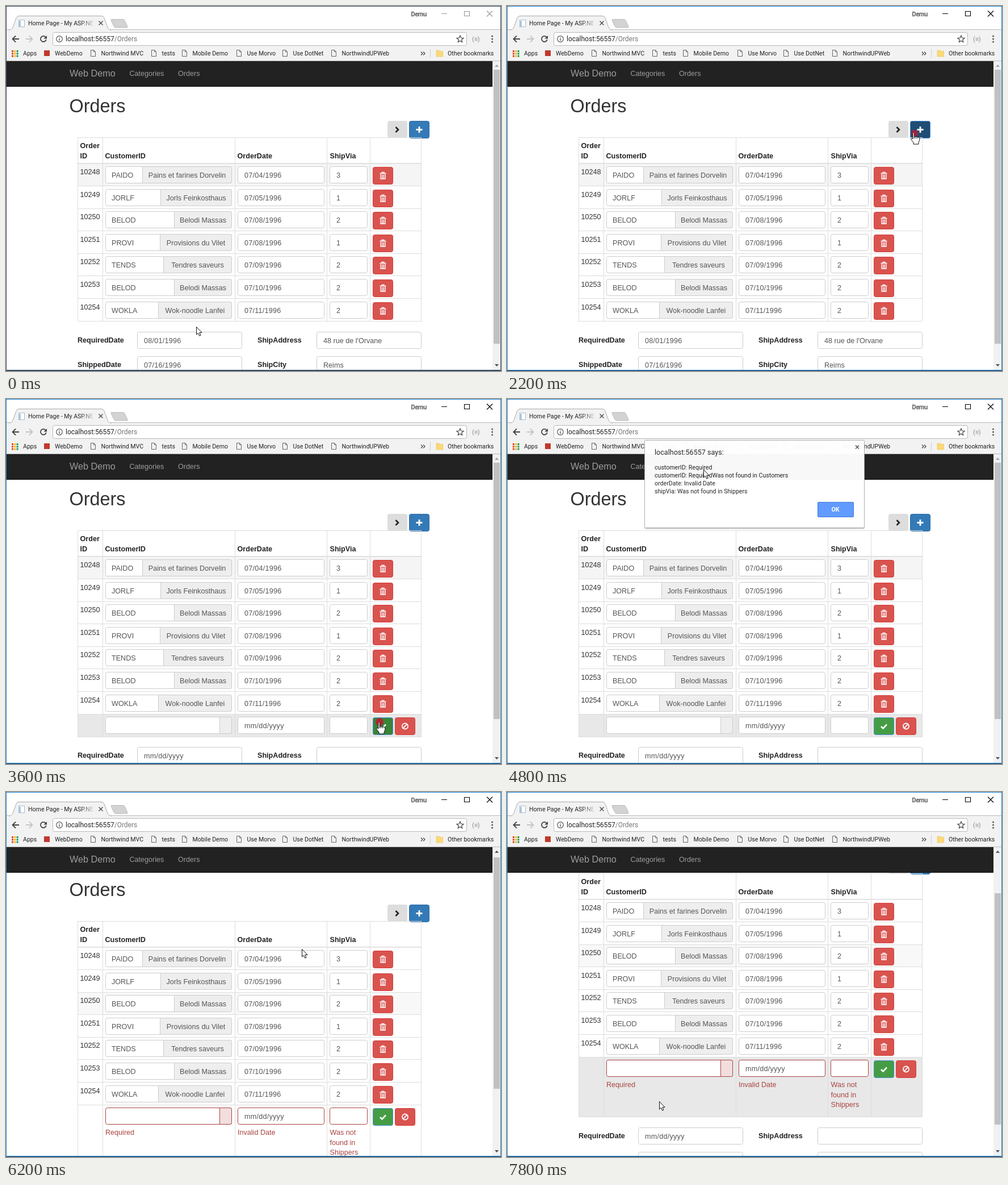
Recreate the animation shown at these times as an HTML page. Size 872 px wide and 642 px high, loop 8000 ms.

```html
<!DOCTYPE html>
<html lang="en">
<head>
<meta charset="utf-8">
<title>Orders</title>
<style>
html, body { margin: 0; width: 100%; height: 100%; overflow: hidden; background: #fff; }
svg { display: block; }
text { font: 12.6px "Liberation Sans", Arial, sans-serif; fill: #333; white-space: pre; }
.bold { font-weight: bold; fill: #222; }
.field { fill: #555; }
.date { fill: #555; letter-spacing: .25px; }
.error { fill: #a94442; }
.nav { fill: #9d9d9d; }
.ui { font: 10.6px Roboto, sans-serif; fill: #222; }
.url { font: 12px Roboto, sans-serif; fill: #222; }
</style>
</head>
<body>
<svg id="stage" width="872" height="642" viewBox="0 0 872 642"></svg>
<script>
const LOOP = 8000, TICK = 200;
const RED = '#d9534f', ERROR = '#a94442', BORDER = '#ccc';
const COLUMNS = [126, 170, 403, 565, 641, 732];

// code, customer, left edge of the customer name, date, shipper
const ORDERS = [
  ['PAIDO', 'Pains et farines Dorvelin', 240, '07/04/1996', 3],
  ['JORLF', 'Jorls Feinkosthaus', 272, '07/05/1996', 1],
  ['BELOD', 'Belodi Massas', 296, '07/08/1996', 2],
  ['PROVI', 'Provisions du Vilet', 271, '07/08/1996', 1],
  ['TENDS', 'Tendres saveurs', 277, '07/09/1996', 2],
  ['BELOD', 'Belodi Massas', 296, '07/10/1996', 2],
  ['WOKLA', 'Wok-noodle Lanfei', 268, '07/11/1996', 2],
];

// time followed by the values that hold then
const POINTER = [
  [1000, 335, 564], [2000, 716, 222], [2400, 716, 222], [3400, 657, 568], [3800, 657, 568],
  [4600, 346, 124], [4800, 346, 124], [5400, 591, 190], [5800, 591, 190], [6400, 498, 305],
  [7000, 184, 530], [7400, 598, 528], [7800, 268, 544],
];
const DIALOG = [
  [3600, -15, 0], [3800, -10, .3], [4000, 0, .97], [5400, 0, .97], [5600, -5, .86], [5800, -15, 0],
];
const SCROLL = [[6000, 0], [6200, 4], [6400, 88]];
const CLICKS = [[2200, 718, 224, 6, .8], [3600, 658, 568, 7, .8], [5600, 591, 191, 13, .5]];

function track(keys, t) {
  const next = keys.findIndex(key => key[0] > t);
  if (next === 0) return keys[0].slice(1);
  if (next < 0) return keys[keys.length - 1].slice(1);
  const a = keys[next - 1], b = keys[next];
  const k = (1 - Math.cos(Math.PI * (t - a[0]) / (b[0] - a[0]))) / 2;
  return a.slice(1).map((v, i) => v + (b[i + 1] - v) * k);
}

const text = (x, y, s, cls = '', more = '') => `<text x="${x}" y="${y}" class="${cls}" ${more}>${s}</text>`;
const rect = (x, y, w, h, fill, more = '') => `<rect x="${x}" y="${y}" width="${w}" height="${h}" fill="${fill}" ${more}/>`;
const box = (x, y, w, h, fill = '#fff', stroke = BORDER, r = 3) =>
  rect(x + .5, y + .5, w - 1, h - 1, fill, `stroke="${stroke}" rx="${r}"`);
const fill = (d, color, more = '') => `<path d="${d}" fill="${color}" ${more}/>`;
const line = (d, color, width = 1, more = '') =>
  `<path d="${d}" fill="none" stroke="${color}" stroke-width="${width}" ${more}/>`;
const at = (x, y, content) => `<g transform="translate(${x} ${y})">${content}</g>`;

const trash = line('M-5.5-4h11M-2-4.5v-1.500h4v1.500', '#fff', 1.3) +
  line('M-4-3v8.500h8v-8.500M-1.300-2v7M1.300-2v7', '#fff', 1.4);
const check = line('M-5 .5l3.5 3.5 6.5-7', '#fff', 2.6);
const ban = '<circle r="5" fill="none" stroke="#fff" stroke-width="1.8"/>' + line('M-3.5 3.5l7-7', '#fff', 1.8);
const plus = line('M-5.500 0h11M0-5.500v11', '#fff', 2.8);
const chevron = line('M-3-4.500l4.500 4.500-4.500 4.500', '#222', 2.6);
const page = line('M.5.5h5l3 3v8h-8zM5.5.5v3h3', '#666');

const button = (x, y, color, stroke, icon) => box(x, y, 36, 31, color, stroke) + at(x + 18, y + 15.5, icon);

function customerField(y, left, stroke = BORDER, tint = '#eee') {
  return box(175, y, 223, 30, '#fff', stroke) +
    fill(`M${left + .5} ${y + .5}H394.5a3 3 0 0 1 3 3v23a3 3 0 0 1-3 3H${left + .5}z`, tint, `stroke="${stroke}"`);
}

function orderRow([code, name, left, date, via], i) {
  const top = Math.round(277 + 39.6 * i), y = top + 5;
  return rect(126, top + 39, 606, 1, '#ddd') + text(130.5, top + 19, 10248 + i) +
    customerField(y, left) + text(186, y + 20, code, 'field') +
    text((left + 398) / 2, y + 20, name, 'field', 'text-anchor="middle"') +
    box(408, y, 153, 30) + text(420, y + 20, date, 'date') +
    box(570, y, 67, 30) + text(582, y + 20, via, 'field') +
    button(646, y + 1, RED, '#d43f3a', trash);
}

function rowShade(t) {
  if (t < 3000) return '#f5f5f5';
  if (t < 5600) return '#e8e8e8';
  if (t < 5800) return '#f0f0f0';
  return t < 6800 ? '#fff' : '#e8e8e8';
}

function newRow(t) {
  const failed = t >= 5600, marked = t >= 5800;
  const stroke = marked ? ERROR : BORDER;
  const pressed = t === 3600;
  let out = rect(126, 555, 606, marked ? 105 : 39, rowShade(t));
  out += customerField(559, 376, failed ? ERROR : BORDER, failed ? '#f2dede' : '#eee');
  if (failed && !marked) out += box(175, 559, 202, 30);
  out += box(408, 559, 153, 30, '#fff', stroke) + text(420, 579, 'mm/dd/yyyy', 'date') +
    box(570, 559, 67, 30, '#fff', stroke) +
    button(646, 560, pressed ? '#398439' : '#449d44', t >= 3600 ? '#4a90d9' : '#398439', check) +
    button(685, 560, RED, '#d43f3a', ban);
  if (failed) {
    out += text(175, 607, 'Required', 'error') + text(408, 607, 'Invalid Date', 'error');
    ['Was not', 'found in', 'Shippers'].forEach((s, i) => out += text(570.5, 607 + 17.6 * i, s, 'error'));
  }
  return out + rect(126, failed ? 659 : 594, 606, 1, '#ddd');
}

function details(y, isNew) {
  const row = (top, a, va, b, vb) =>
    text(126, top + 19, a, 'bold') + box(231, top, 185, 30) + text(243, top + 20, isNew ? 'mm/dd/yyyy' : va, 'date') +
    text(443, top + 19, b, 'bold') + box(547, top, 185, 30) + text(559, top + 20, isNew ? '' : vb, 'field');
  return row(y, 'RequiredDate', '08/01/1996', 'ShipAddress', "48 rue de l'Orvane") +
    row(y + 43, 'ShippedDate', '07/16/1996', 'ShipCity', 'Reims');
}

function content(t) {
  const adding = t >= 2400, failed = t >= 5600, pressed = t === 2200;
  const bottom = failed ? 660 : adding ? 594 : 555;
  return text(111.5, 187, 'Orders', '', 'style="font-size:32.4px"') +
    box(672, 202, 35, 30, '#ddd', '#ddd') + at(689.5, 217.5, chevron) +
    button(710, 202, pressed ? '#204d74' : '#337ab7', pressed ? '#4a90d9' : '#2e6da4', plus) +
    rect(126, t < 6200 ? 277 : 357, 606, 39, t < 6200 ? '#f5f5f5' : '#f8f8f8') +
    rect(126, 231, 606, 1, '#ddd') + rect(126, 276, 606, 1.6, '#ddd') +
    text(130.5, 250, 'Order', 'bold') + text(130.5, 268, 'ID', 'bold') + text(174.5, 268, 'CustomerID', 'bold') +
    text(407.5, 268, 'OrderDate', 'bold') + text(570.5, 268, 'ShipVia', 'bold') +
    ORDERS.map(orderRow).join('') + (adding ? newRow(t) : '') +
    COLUMNS.map(x => rect(x - (x > 700 ? 1 : 0), 231, 1, bottom - 231, '#ddd')).join('') +
    (t === 6400 ? at(513, 338, line('M-3.5-3.5l7 7M3.5-3.5l-7 7', '#3668a8', 2) +
      fill('M9.5-2l3.5-4 3.5 4zM9.5 2l3.5 4 3.5-4zM24-4h9l-4.5 8z', '#444')) : '') +
    details(failed ? 678 : adding ? 612 : 573, adding);
}

function browser(active) {
  const ink = active ? '#000' : '#999';
  const bookmarks = [[149, 'Northwind MVC'], [256, 'tests'], [310, 'Mobile Demo'], [406, 'Use Morvo'],
    [487, 'Use DotNet'], [573, 'NorthwindUPWeb']];
  const dots = ['#db4437', '#f4b400', '#0f9d58', '#4285f4'];
  let out = rect(0, 0, 872, 41, '#fff') + rect(0, 41, 872, 56, '#f2f2f2') +
    line('M0 41.5H872M0 96.5H872', '#bbb') +
    fill('M5 42C11 42 11 39 13 35L18 21Q19.500 17.500 23 17.500H168Q171.500 17.500 173 21L178 35C180 39 180 42 186 42', '#f2f2f2', 'stroke="#aaa"') +
    fill('M187 23.500H206Q208 23.500 209 25.500L214 36Q214.500 38 212 38H194Q191 38 190 35.500L185 25Q184.500 23.500 187 23.500', '#d3d3d3', 'stroke="#bbb"') +
    box(22, 24, 11, 13, '#fff', '#a9bdd0', 0) + rect(23, 26, 3, 10, '#a8c8e4') +
    text(39, 34, 'Home Page - My ASP.NE', 'ui') + rect(130, 22, 28, 17, 'url(#fade)') +
    line('M163.500 26.500l7 7M170.500 26.500l-7 7', '#444', 1.3) +
    text(713.5, 18, 'Demu', 'ui', 'stroke="#777" stroke-width=".7"') +
    line('M767 13.500h10M807.500 9.500h9v8h-9zM847 8.500l10 10M857 8.500l-10 10', ink, 1.1) +
    line('M23 58H11.500M17 52.500L11.500 58l5.500 5.500', '#444', 1.8) +
    line('M35 58h11.500M41 52.500l5.500 5.500-5.500 5.500', '#c4c4c4', 1.8) +
    line('M70 55a5 5 0 1 0 .8 4', '#444', 1.8) + fill('M72 52v5.500h-5.500z', '#444') +
    box(82, 46, 730, 24, '#fff', '#b8b8b8') +
    '<circle cx="94" cy="58" r="5.300" fill="none" stroke="#555" stroke-width="1.2"/>' +
    line('M94 55v1.200M94 57.300v3.700', '#555', 1.4) +
    text(105, 62, 'localhost:56557<tspan fill="#777">/Orders</tspan>', 'url') +
    line('M800 52l1.700 4 4.300.4-3.300 2.800 1 4.300-3.700-2.300-3.700 2.300 1-4.300-3.300-2.800 4.300-.4z', '#444', 1.2) +
    text(821, 62, '(≡)', 'ui', 'style="fill:#888"');
  for (const y of [53, 58, 63]) out += `<circle cx="856.5" cy="${y}" r="1.5" fill="#555"/>`;
  for (let i = 0; i < 9; i++) out += rect(10 + i % 3 * 4.300, 78 + Math.floor(i / 3) * 4.300, 3, 3, dots[(i + Math.floor(i / 3)) % 4]);
  out += text(30, 87, 'Apps', 'ui') + rect(67, 78, 10, 10, '#c0392b') + text(86, 87, 'WebDemo', 'ui');
  for (const [x, name] of bookmarks) out += at(x, 77, page) + text(x + 18.500, 87, name, 'ui');
  return out + line('M731 80.500l3 3-3 3M735 80.500l3 3-3 3', '#444', 1.2) + rect(747, 76, 1, 15, '#ccc') +
    fill('M758 78h5l1 1.500h5.500V89H758z', '#fbd978', 'stroke="#e8c050" stroke-width=".6"') +
    text(778, 87, 'Other bookmarks', 'ui');
}

function scrollbar(t, scroll) {
  const size = t < 2400 ? 482 : t < 5600 ? 451 : 407;
  return rect(857, 97, 14, 543, '#f1f1f1') + rect(859, 112 + scroll * .75, 11, size, '#c1c1c1') +
    fill('M861 107l3.500-4 3.500 4z', scroll ? '#505050' : '#a3a3a3') + fill('M861 630l3.500 4 3.500-4z', '#505050');
}

function dialog(t) {
  const [dy, opacity] = track(DIALOG, t);
  if (!opacity) return '';
  const pressed = t === 5600;
  const lines = ['customerID: Required', 'customerID: RequiredWas not found in Customers',
    'orderDate: Invalid Date', 'shipVia: Was not found in Shippers'];
  return `<g transform="translate(0 ${dy})" opacity="${opacity}">` +
    rect(242, 73, 388, 156, '#000', 'rx="3" opacity=".18"') + box(242, 72, 388, 155, '#fff', '#aaa', 2) +
    line('M614 81.500l6 6M620 81.500l-6 6', '#555', 1.6) +
    text(260, 98, 'localhost:56557 says:', 'url', 'style="font-size:12.6px"') +
    lines.map((s, i) => text(260, 124 + 14 * i, s, 'ui')).join('') +
    box(547, 181, 64, 27, pressed ? '#2f68d2' : '#5c98ff', pressed ? '#1f50ac' : '#3f78d8', 1) +
    text(578.5, 198, 'OK', 'ui', 'text-anchor="middle" style="fill:#fff;font-weight:bold"') + '</g>';
}

function pointer(t) {
  const [x, y] = track(POINTER, t);
  const hand = (t >= 2000 && t <= 2400) || (t >= 3400 && t <= 3800);
  const arrow = 'M.5.5V14l3-2.800 2.200 5 2.300-1-2.200-4.800H10z';
  const finger = 'M-1 1.500Q0-.5 1.500 1.500V8L4 7.500 6.500 8 9 9Q11 9.500 11 12T9 18V21H0V18L-4.500 12.500Q-4.500 10-2 11L-1 12z';
  const ring = CLICKS.filter(click => click[0] === t).map(([, cx, cy, r, o]) =>
    `<circle cx="${cx}" cy="${cy}" r="${r}" fill="#c81432" opacity="${o}"/>`).join('');
  return ring + at(Math.round(x), Math.round(y),
    fill(hand ? finger : arrow, '#fff', 'stroke="#111" stroke-linejoin="round"') +
    (hand ? line('M1.500 8v3M4 8v3M6.500 8.500v2.500', '#111') : ''));
}

function scene(t) {
  const [scroll] = track(SCROLL, t), active = t >= 2200;
  return '<defs><linearGradient id="fade"><stop stop-color="#f2f2f2" stop-opacity="0"/><stop offset="1" stop-color="#f2f2f2"/></linearGradient></defs>' +
    rect(0, 0, 872, 642, '#fff') + at(0, -scroll, content(t)) +
    rect(0, 97, 857, 45, '#222') + rect(0, 141, 857, 1, '#080808') +
    text(112, 124, 'Web Demo', 'nav', 'style="font-size:16.2px"') +
    text(217.5, 123, 'Categories', 'nav') + text(303, 123, 'Orders', 'nav') +
    browser(active) + scrollbar(t, scroll) + dialog(t) +
    rect(0, 641, 872, 1, '#34495f') + line('M.5 0V640.500H871.500V0M0 .5H872', active ? '#1883d7' : '#34495f') +
    pointer(t);
}

const stage = document.getElementById('stage');
const start = performance.now();
let shown = -1;
function draw() {
  const t = Math.floor((performance.now() - start) % LOOP / TICK) * TICK;
  if (t !== shown) stage.innerHTML = scene(shown = t);
  requestAnimationFrame(draw);
}
draw();
</script>
</body>
</html>
```
